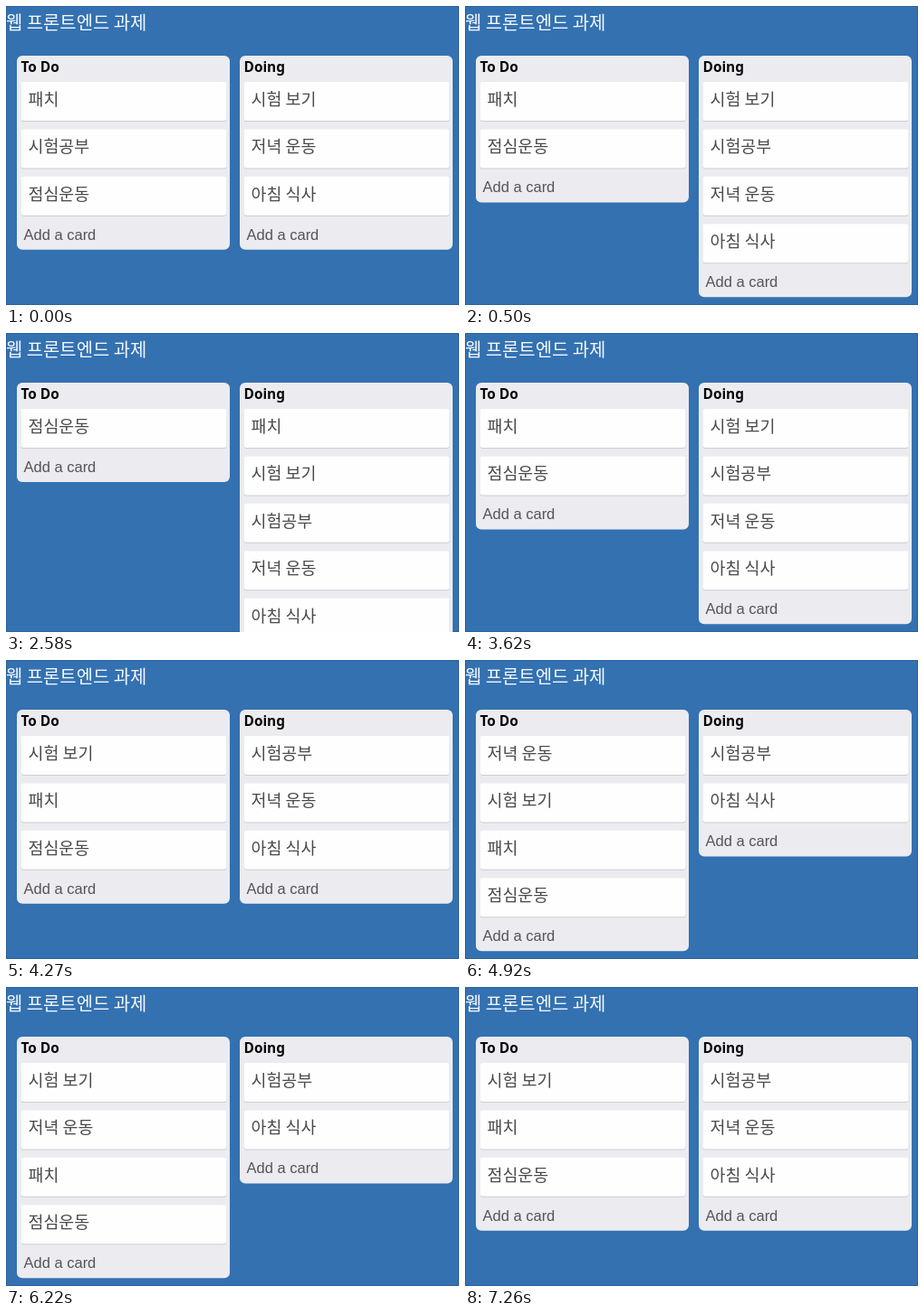
Animation of 500x331 px, one loop 8000 ms. Source, as an HTML page with a canvas:

```html
<!DOCTYPE html>
<html lang="ko">
<head>
<meta charset="utf-8">
<title>웹 프론트엔드 과제</title>
<style>
  html, body { margin: 0; width: 100%; height: 100%; overflow: hidden; background: #3371b1; }
  canvas { display: block; }
</style>
</head>
<body>
<canvas id="stage" width="500" height="331"></canvas>
<script>
const ctx = document.getElementById('stage').getContext('2d');
const LOOP = 8000;
const KOREAN = '"Noto Sans CJK KR", "Noto Sans CJK", sans-serif';
const PITCH = 52.4;

const patch = '패치', study = '시험공부', lunch = '점심운동';
const exam = '시험 보기', evening = '저녁 운동', breakfast = '아침 식사';

// Each step holds until the next one starts; cards jump on drop.
const steps = [
  { at: 0, todo: [patch, study, lunch], doing: [exam, evening, breakfast] },
  { at: 500, todo: [patch, lunch], doing: [exam, study, evening, breakfast] },
  { at: 1410, todo: [lunch], doing: [patch, exam, study, evening, breakfast] },
  { at: 3620, todo: [patch, lunch], doing: [exam, study, evening, breakfast] },
  { at: 4270, todo: [exam, patch, lunch], doing: [study, evening, breakfast] },
  { at: 4920, todo: [evening, exam, patch, lunch], doing: [study, breakfast] },
  { at: 5050, todo: [exam, evening, patch, lunch], doing: [study, breakfast] },
  { at: 7260, todo: [exam, patch, lunch], doing: [study, evening, breakfast] }
];

function box(x, y, w, h, radius, color) {
  ctx.fillStyle = color;
  ctx.beginPath();
  ctx.roundRect(x, y, w, h, radius);
  ctx.fill();
}

function label(text, x, y, font, color) {
  ctx.font = font;
  ctx.fillStyle = color;
  ctx.fillText(text, x, y);
}

function drawList(x, title, cards) {
  const height = 110 + PITCH * (cards.length - 1);
  box(x, 55, 235, height, 6, '#ebebf0');
  label(title, x + 4.5, 73, 'bold 15.4px "Noto Sans", sans-serif', '#080808');
  cards.forEach((text, i) => {
    const y = 84 + PITCH * i;
    box(x + 4.5, y + 1, 227, 43, 3, '#cdcdd1');
    box(x + 4.5, y, 227, 43, 3, '#fefefe');
    label(text, x + 12.5, y + 26, '18.4px ' + KOREAN, '#4a4a4a');
  });
  label('Add a card', x + 7.5, 44 + height,
    '16.5px "Liberation Sans", Arial, sans-serif', '#555558');
}

function draw(time) {
  const step = steps.findLast(s => s.at <= time);
  ctx.fillStyle = '#3371b1';
  ctx.fillRect(0, 0, 500, 331);
  ctx.strokeStyle = '#2d639b';
  ctx.lineWidth = 1;
  ctx.strokeRect(0.5, 0.5, 499, 330);
  label('웹 프론트엔드 과제', 0, 25.5, '19.9px ' + KOREAN, '#f7f9fc');
  drawList(12, 'To Do', step.todo);
  drawList(258, 'Doing', step.doing);
}

function tick() {
  draw(performance.now() % LOOP);
  requestAnimationFrame(tick);
}
tick();
</script>
</body>
</html>
```
